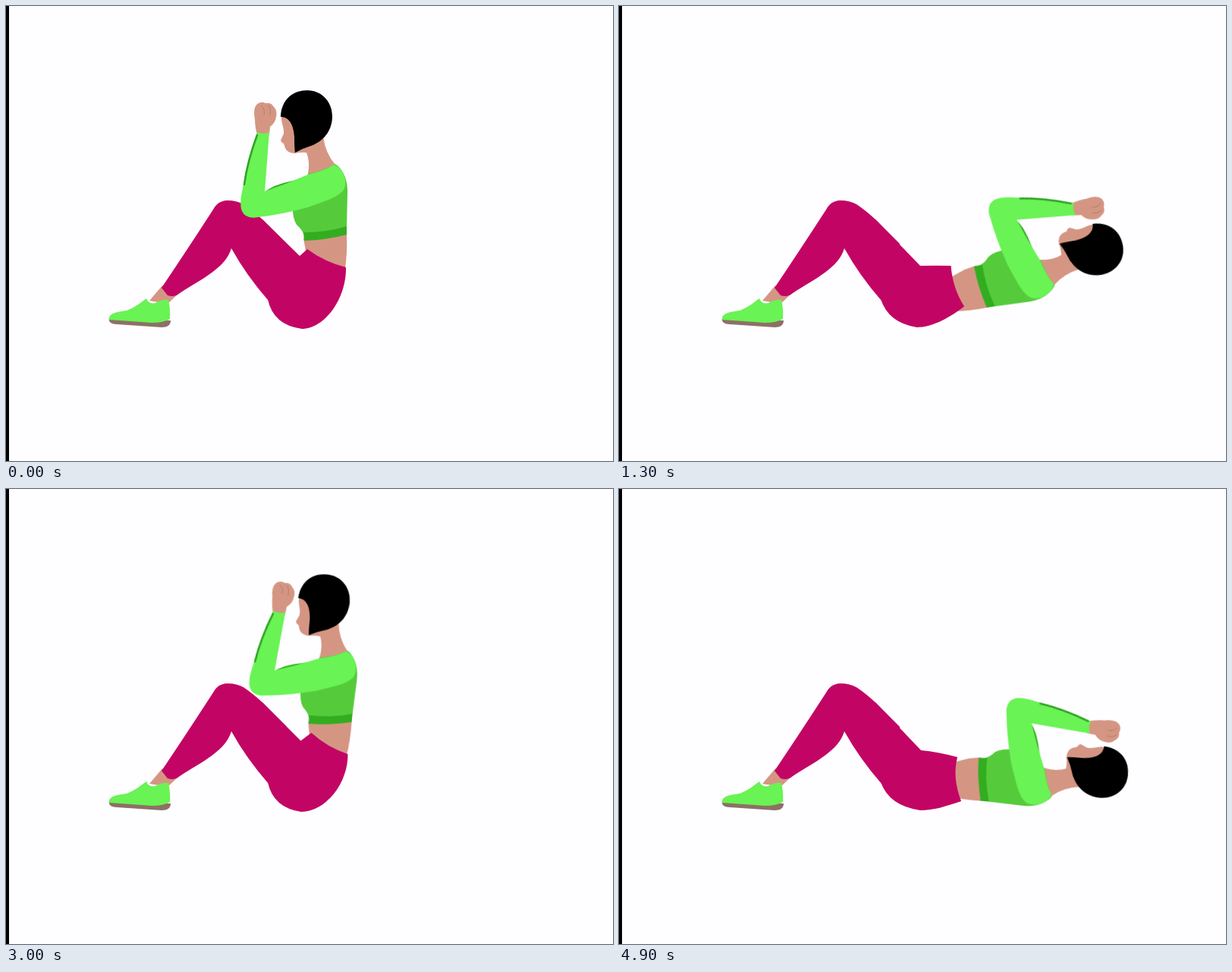
An HTML page without scripts that plays this animation: 800 px wide and 599 px high, repeating every 5000 ms.

```html
<!DOCTYPE html>
<html lang="en">
<head>
<meta charset="utf-8">
<title>Sit-ups</title>
<style>
html, body { margin: 0; width: 100%; height: 100%; overflow: hidden; background: #fefdff; }
svg { display: block; width: 100%; height: 100%; }

.skin { fill: #d49683; }
.lime { fill: #69f354; }
.green { fill: #55cb3b; }
.band { fill: #32ad20; }
.pants { fill: #c20564; }
.shade { fill: none; stroke: #32a128; stroke-width: 2.5; stroke-linecap: round; }
.crease { fill: none; stroke: #b97c6b; stroke-width: 1; }

/* the upper body turns around the front of the waist */
.torso { transform-origin: 393px 309px; animation: situp 5s steps(2) infinite; }

.hips {
  --up: path("M345 386L338 281L387 329Q392 325 397 320Q420 337 448 344C449 385 420 425 390 425Q352 420 345 386Z");
  --lean: path("M345 386L338 281L390 334Q399 327 408 322Q427 343 453 354C453 390 422 425 388 425Q352 419 345 386Z");
  --half: path("M345 386L338 281L393 338Q410 333 426 328Q437 357 458 372C440 400 412 423 385 423Q354 418 345 386Z");
  --low: path("M345 386L338 281L396 340Q413 337 429 331Q440 362 459 380C442 402 412 423 388 423Q354 417 345 386Z");
  --flat: path("M345 386L338 281L398 344Q420 346 446 353Q439 380 451 411C430 418 415 423 397 423Q356 417 345 386Z");
  d: var(--up);
  animation: hips 5s infinite;
}

@keyframes situp {
  0% { transform: none; }
  4% { transform: translate(3px, 0) rotate(3deg); }
  8% { transform: translate(9px, 0) rotate(10deg); }
  12% { transform: translate(24px, 2px) rotate(23.5deg); }
  16% { transform: translate(40px, 5px) rotate(42deg); }
  20% { transform: translate(60px, 18px) rotate(60deg); }
  24% { transform: translate(72px, 29px) rotate(75deg); }
  28% { transform: translate(78px, 39px) rotate(87deg); }
  32% { transform: translate(81px, 45px) rotate(95deg); }
  36% { transform: translate(82px, 46px) rotate(98deg); }
  40% { transform: translate(82px, 46px) rotate(97deg); }
  44% { transform: translate(76px, 37px) rotate(84deg); }
  48% { transform: translate(64px, 22px) rotate(63deg); }
  52% { transform: translate(38px, 5px) rotate(39deg); }
  56% { transform: translate(20px, 1px) rotate(19deg); }
  60% { transform: translate(6px, 0) rotate(6deg); }
  64% { transform: translate(1px, 0) rotate(.7deg); }
  68% { transform: translate(1px, 0) rotate(1deg); }
  72% { transform: translate(8px, 0) rotate(8deg); }
  76% { transform: translate(18px, 1px) rotate(16deg); }
  80% { transform: translate(33px, 3px) rotate(34deg); }
  84% { transform: translate(55px, 14px) rotate(53deg); }
  88% { transform: translate(70px, 26px) rotate(70deg); }
  92% { transform: translate(77px, 37px) rotate(84deg); }
  96% { transform: translate(81px, 44px) rotate(93deg); animation-timing-function: step-end; }
  98%, 100% { transform: translate(81px, 45px) rotate(95.5deg); }
}

@keyframes hips {
  0% { d: var(--up); animation-timing-function: steps(5); }
  10% { d: var(--lean); animation-timing-function: steps(3); }
  16% { d: var(--half); animation-timing-function: steps(1); }
  18% { d: var(--low); animation-timing-function: steps(8); }
  34% { d: var(--flat); animation-timing-function: steps(3); }
  40% { d: var(--flat); animation-timing-function: steps(5); }
  50% { d: var(--low); animation-timing-function: steps(1); }
  52% { d: var(--half); animation-timing-function: steps(2); }
  56% { d: var(--lean); animation-timing-function: steps(4); }
  64% { d: var(--up); animation-timing-function: steps(1); }
  66% { d: var(--up); animation-timing-function: steps(5); }
  76% { d: var(--lean); animation-timing-function: steps(3); }
  82% { d: var(--half); animation-timing-function: steps(1); }
  84% { d: var(--low); animation-timing-function: steps(7); }
  98%, 100% { d: var(--flat); animation-timing-function: step-end; }
}
</style>
</head>
<body>
<svg viewBox="0 0 800 599" preserveAspectRatio="none">
  <rect width="4" height="599"/>

  <!-- waist, tucked into the pants -->
  <path class="skin torso" d="M392 306L395 322L405 350H440L447 345Q450 325 449 299Z"/>

  <!-- foot and leg -->
  <path class="skin" d="M206 368L189 388L213 392L227 379Z"/>
  <path fill="#8d7066" d="M136 411Q134 418 146 419L205 423Q217 423 217 414Z"/>
  <path class="lime" d="M136 413C135 404 146 403 159 401C170 397 178 390 185 385Q188 393 197 391Q206 386 214 387Q217 399 216 412Q208 417 192 417Q165 415 136 413Z"/>
  <path class="pants" d="M205 371Q238 322 273 268C279 257 287 256 293 256Q303 256 313 261Q325 269 338 281L370 313V400L346 388Q317 355 297 319C289 345 260 358 229 378Q222 384 213 381Z"/>
  <path class="pants hips"/>

  <g class="torso">
    <!-- neck and face -->
    <path class="skin" d="M363 144C362 153 367 160 366 168L362 177Q363 180 366 181L368 187Q371 194 381 194Q389 192 396 193Q401 205 398 221L420 222L434 209Q421 194 418 172L390 145Z"/>
    <path d="M362 146C363 122 379 111 397 111C416 111 430 126 430 145C430 163 420 176 405 183Q392 187 381 193Q380 188 380 172C379 156 373 146 362 146Z"/>

    <!-- top -->
    <path class="green" d="M398 221Q419 217 434 208C446 216 451 232 450 248L449 293L392 300Q390 294 383 288Q377 278 378 263Z"/>
    <path class="band" d="M392 298Q422 298 449 290L449 301Q422 308 393 309Z"/>

    <!-- arm -->
    <path class="skin" d="M331 170Q328 158 328 149Q325 135 331 129Q337 125 342 128Q350 127 353 133Q358 137 356 146Q355 154 348 159L347 170Z"/>
    <path class="crease" d="M336 131Q342 136 340 143M346 131Q350 137 348 144"/>
    <path class="band" d="M339 246Q353 235 374 231Q384 228 394 227L378 240Z"/>
    <path class="lime" d="M331 166Q339 170 347 166Q344 205 341 244Q370 234 398 222Q420 217 432 209C445 213 451 231 445 242C437 253 416 258 398 265Q361 275 332 278Q316 281 311 270Q307 261 312 240Q317 203 331 166Z"/>
    <path class="shade" d="M331 170Q318 205 314 235"/>
  </g>
</svg>
</body>
</html>
```
